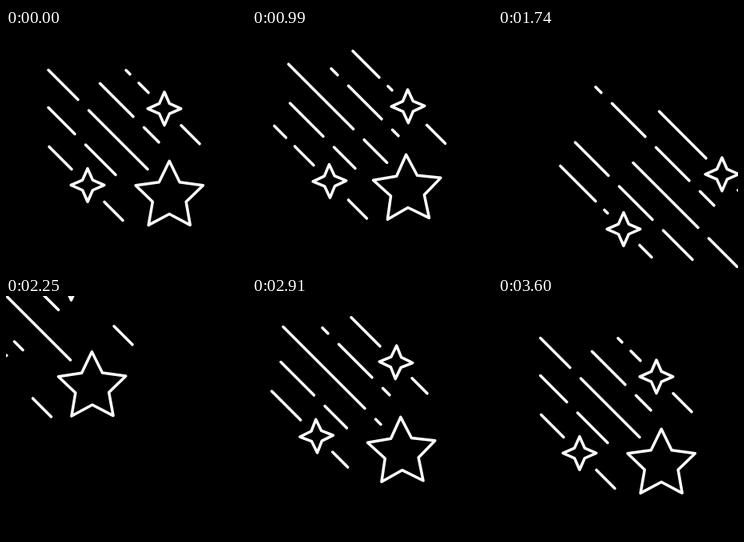
These frames come from a looping animation (300x300 px, 4130 ms). An HTML page with a canvas:

```html
<!DOCTYPE html>
<html lang="en">
<head>
<meta charset="utf-8">
<title>Shooting stars</title>
<style>
  html, body { margin: 0; width: 100%; height: 100%; overflow: hidden; background: #000; }
  canvas { display: block; width: 300px; height: 300px; }
</style>
</head>
<body>
<canvas id="sky" width="300" height="300"></canvas>
<script>
const ctx = document.getElementById('sky').getContext('2d');
const LOOP = 4130, END = 3600, STEP = 30, DIAG = Math.SQRT2;

// Smooth curve through the given points, with no overshoot and soft ends.
function curve(times, values) {
  const slope = values.slice(1).map((v, i) => (v - values[i]) / (times[i + 1] - times[i]));
  const tangent = values.map((_, i) => {
    const a = slope[i - 1] || 0, b = slope[i] || 0;
    return a * b > 0 ? 2 * a * b / (a + b) : 0;
  });
  return t => {
    let i = 0;
    while (i < times.length - 2 && t >= times[i + 1]) i++;
    const h = times[i + 1] - times[i];
    const u = Math.min(1, (t - times[i]) / h), w = 1 - u;
    return values[i] * w * w * (1 + 2 * u) + values[i + 1] * u * u * (3 - 2 * u)
      + h * u * w * (tangent[i] * w - tangent[i + 1] * u);
  };
}

const BEATS = [0, 570, 990, 1740, 2250, 2910, END];
const track = (...values) => curve(BEATS, values);

// Pull back, shoot off to the lower right, come back in from the upper left.
const WRAP = 2040;
function flight(out, back) {
  const leave = curve([0, 570, 990, 1200, 1740, WRAP], [0, ...out, 300]);
  const enter = curve([WRAP, 2250, 2910, END], [-300, ...back, 0]);
  return t => t < WRAP ? leave(t) : enter(t);
}

const move = {
  big:    flight([-5, -9, -10.5, 145], [-96.5, -16]),
  middle: flight([-4.3, -8.3, -9.5, 145], [-96.5, -16]),
  lower:  flight([-4, -8, -9, 106], [-116, -18.5]),
  upper:  flight([-4, -8, -9, 79], [-120.5, -19]),
  right:  flight([-1, -3, -4, 82], [-116.5, -18]),
  left:   flight([-3.2, -5, -6, 55], [-122, -21.3])
};

const tilt = {
  big:   track(0, 2, -2, 0, -0.5, -1.6, 0),
  right: track(0, -3, -1, 0, 0, 2, 0),
  left:  track(0, 2.5, -1.5, 0, 0, -2.5, 0)
};
const sway = track(0, 1.2, 1, 0, 0, 1.2, 0);

const length = {
  middle: track(124, 123, 123, 153, 140, 122, 124),
  side:   track(84, 84, 84, 148, 110, 84, 84),
  tail:   track(28, 45, 49, 59, 60, 36, 28)
};

const flow = {
  middle: track(0, 49.5, 84, 114, 162, 191, 258),
  side:   track(0, 76, 99, 164, 248, 320, 385),
  tail:   track(0, 60, 66, 119.5, 150, 174, 219),
  front:  track(0, 77, 129.5, 207, 297.5, 401, 462)
};

// Diagonal dashed line from (x, y); all lengths are horizontal distances.
function streak(x, y, run, dash, gap, start) {
  ctx.setLineDash([dash * DIAG, gap * DIAG]);
  ctx.lineDashOffset = -start * DIAG;
  ctx.beginPath();
  ctx.moveTo(x, y);
  ctx.lineTo(x + run, y + run);
  ctx.stroke();
}

function star(x, y, points, outer, inner, degrees) {
  ctx.setLineDash([]);
  ctx.beginPath();
  for (let i = 0; i < points * 2; i++) {
    const a = i * Math.PI / points - Math.PI / 2 + degrees * Math.PI / 180;
    const r = i % 2 ? inner : outer;
    ctx.lineTo(x + r * Math.cos(a), y + r * Math.sin(a));
  }
  ctx.closePath();
  ctx.stroke();
}

function smallStar(x, y, side, gapAt, t) {
  const d = move[side](t);
  x += d;
  y += d;
  star(x, y, 4, 20.8, 9, tilt[side](t));
  streak(x - 20, y - 20, -length.tail(t), 62, 11, gapAt + flow.tail(t));
  streak(x + 20, y + 20, 57, 23, 43, 1 - flow.front(t));
}

function trail(x, y, name, kind, dash, gap, gapAt, t) {
  const d = move[name](t);
  streak(x + d, y + d, -length[kind](t), dash, gap, gapAt + flow[kind](t));
}

function draw(t) {
  ctx.fillStyle = '#000';
  ctx.fillRect(0, 0, 300, 300);
  ctx.strokeStyle = '#fff';
  ctx.lineWidth = 3.5;
  ctx.lineCap = ctx.lineJoin = 'round';

  trail(177, 176.5, 'middle', 'middle', 115.5, 13.5, 87, t);
  trail(191, 142.8, 'upper', 'side', 41.5, 13.5, 32, t);
  trail(137, 183.5, 'lower', 'side', 41.5, 13.5, 51, t);
  smallStar(198, 100.8, 'right', 23, t);
  smallStar(102, 196.4, 'left', 41.5, t);

  const d = move.big(t), s = sway(t);
  star(204.2 + d - s, 210.5 + d + s, 5, 44.3, 22, tilt.big(t));
}

const began = performance.now();
function tick() {
  const t = (performance.now() - began) % LOOP;
  draw(Math.min(END, Math.floor(t / STEP) * STEP));
  requestAnimationFrame(tick);
}
tick();
</script>
</body>
</html>
```
